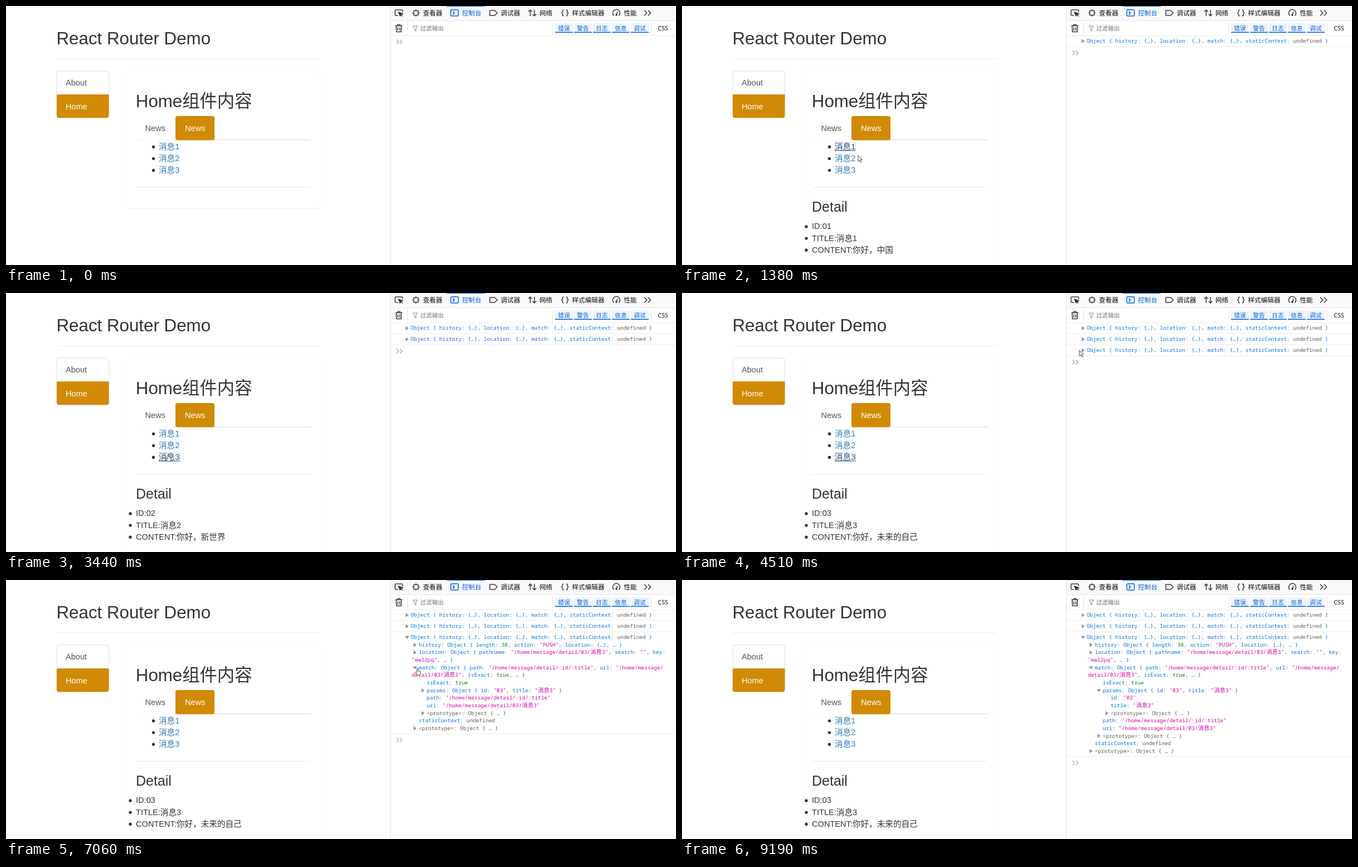
An HTML page that plays this animation: 1202x466 px, repeating every 9520 ms.

```html
<!DOCTYPE html>
<html lang="zh-CN">
<head>
<meta charset="utf-8">
<title>React Router Demo</title>
<style>
html, body { margin: 0; width: 100%; height: 100%; overflow: hidden; background: #fff; }
svg { display: block; width: 1202px; height: 466px; }
text { white-space: pre; font: 14.6px "Liberation Sans", "Noto Sans CJK SC", "Noto Sans CJK", sans-serif; fill: #333; }
.h2 { font-size: 31.3px; }
.h3 { font-size: 25px; }
.ui { font: 11.6px "Noto Sans", "Noto Sans CJK SC", "Noto Sans CJK", sans-serif; fill: #0c0c0d; }
.small { font-size: 10.6px; }
.mono { font: 9.507px "Noto Sans Mono", "Noto Sans CJK SC", "Noto Sans CJK", monospace; }
.han { font-size: 10.4px; }
.icon { fill: none; stroke: #38383d; stroke-width: 1.5; stroke-linejoin: round; }
.cursor { fill: #fff; stroke: #333; stroke-width: .9; }
</style>
</head>
<body>
<svg viewBox="0 0 1202 466">
  <g id="page"></g>
  <g id="tools"></g>
  <g id="live"></g>
  <path id="arrow" class="cursor" d="M0 0V10.4L2.4 8.3L4 12L5.8 11.2L4.2 7.6H7.4Z"/>
  <path id="hand" class="cursor" d="M-1 1Q0 -1 1 1V5L5 6V8L4.500 13H-1L-4 8L-2.600 7L-1 8.400Z"/>
</svg>
<script>
const STEP = 82.07, STEPS = 116;
const GOLD = '#d08a04', BLUE = '#0074e8', LINK = '#0060df', GRAY = '#5c5c5f', PINK = '#dd00a9', GREEN = '#058b00';
const $ = id => document.getElementById(id);
const esc = s => s.replace(/&/g, '&amp;').replace(/</g, '&lt;');

const text = (x, y, s, cls = '', fill = '') =>
  `<text x="${x}" y="${y}" class="${cls}"${fill && ` style="fill:${fill}"`}>${esc(s)}</text>`;
const rect = (x, y, w, h, fill, more = '') =>
  `<rect x="${x}" y="${y}" width="${w}" height="${h}" fill="${fill}" ${more}/>`;
const icon = (x, y, d, style = '') =>
  `<path class="icon" transform="translate(${x} ${y})" d="${d}" style="${style}"/>`;
const frame = (x, y, w, h, r, color = '#38383d') =>
  rect(x, y, w, h, 'none', `rx="${r}" stroke="${color}" stroke-width="1.5"`);
const dot = (x, y, r = 2.7) => `<circle cx="${x}" cy="${y}" r="${r}" fill="#333"/>`;
const chevrons = (x, y, r, color, w) => [x, x + r + 2].map(cx =>
  icon(cx, y, `M0 ${-r}l${r} ${r}l${-r} ${r}`, `stroke:${color};stroke-width:${w}`)).join('');

function drawPage() {
  return text(90.5, 68.5, 'React Router Demo', 'h2')
    + rect(90.5, 94.5, 473, 1, '#e9e9e9')
    + rect(91, 117, 93.5, 84, '#fff', 'rx="4" stroke="#ddd"')
    + rect(91, 159.3, 93.5, 42, GOLD, 'rx="4"') + rect(91, 159.3, 93.5, 10, GOLD)
    + text(107, 143, 'About', '', '#555') + text(107, 185.6, 'Home', '', '#fff')
    + text(232.8, 182, 'Home组件内容', 'h2')
    + rect(233, 240, 314, 1.4, '#ddd')
    + rect(233, 198, 69.5, 43.5, '#fff', 'rx="4"')
    + rect(304, 198, 70, 43.5, GOLD, 'rx="4"')
    + text(249.5, 225, 'News', '', '#555') + text(321, 225, 'News', '', '#fff')
    + rect(233, 325.8, 314, 1, '#e9e9e9');
}

function drawIcons() {
  return icon(698, 7, 'M5 10H1.5Q0 10 0 8.5V1.5Q0 0 1.5 0H12Q13.5 0 13.5 1.5V4')
    + icon(704, 11, 'M0 0L8 3L5 4L3 7ZM4 4L7.500 7.500', 'fill:#38383d')
    + frame(731.5, 8.5, 8, 8, 0) + icon(735.5, 12.5, 'M0 -6.500v2.500M0 4v2.500M-6.500 0h2.500M4 0h2.500')
    + frame(798, 6.8, 13.5, 11.2, 1.5, LINK) + icon(801.5, 9.6, 'M0 0l3 3l-3 3', `stroke:${LINK}`)
    + icon(868, 8, 'M0 0H8.500L13.500 4.500L8.500 9H0Z')
    + icon(940.5, 7, 'M0 11V0M-3.300 3.500L0 0L3.300 3.500') + icon(948, 18, 'M0 -11V0M-3.300 -3.500L0 0L3.300 -3.500')
    + icon(1000.5, 7, 'M0 0Q-2 0 -2 2V4L-4 5.500L-2 7V9Q-2 11 0 11')
    + icon(1005, 7, 'M0 0Q2 0 2 2V4L4 5.500L2 7V9Q2 11 0 11')
    + icon(1095, 16, 'M-4.500 1.500A6.500 6.500 0 1 1 4.500 1.500M0 0L2 -5.500') + dot(1095, 16, 1.8)
    + chevrons(1145, 12.5, 4.8, '#38383d', 1.6)
    + icon(698.5, 35.5, 'M0 0H12.500M4 0V-2H8.500V0M1.500 0L2 11H10.500L11 0M4.500 3V8.500M8 3V8.500')
    + icon(730, 36, 'M0 0H8.500L5.500 4V9L3 7.500V4Z', 'stroke:#85858a;stroke-width:1');
}

function drawTools() {
  const tabs = { 查看器: 748, 控制台: 818, 调试器: 887.5, 网络: 957, 样式编辑器: 1015.5, 性能: 1108.5 };
  return rect(689, 0, 513, 26, '#f9f9fa') + rect(689, 26, 513, 1, '#e4e4e6')
    + rect(689, 53, 513, 1, '#ebebed') + rect(689, 0, 1, 466, '#e0e0e2')
    + rect(790, 0, 69, 1.2, '#0a84ff')
    + Object.entries(tabs).map(([s, x]) => text(x, 17, s, 'ui', s === '控制台' ? LINK : '')).join('')
    + drawIcons()
    + [720, 980, 1157].map(x => rect(x, 29, 1, 22, '#e6e6e8')).join('')
    + text(743, 44, '过滤输出', 'ui small', '#737373')
    + ['错误', '警告', '日志', '信息', '调试'].map((s, i) => {
      const x = 985 + 34 * i;
      return rect(x, 31, 32, 17, '#edf4fd', 'rx="2"') + rect(x, 46.6, 32, 1.6, LINK)
        + text(x + 5.3, 43.8, s, 'ui small', LINK);
    }).join('')
    + text(1169.5, 43.8, 'CSS', 'ui small');
}

// One console line, coloured by token.
function code(x, y, s) {
  const color = t => s[0] === '<' || t === 'undefined' ? GRAY
    : /^("|detail)/.test(t) ? PINK : /^(\d+|true)$/.test(t) ? GREEN : BLUE;
  const spans = s.split(/((?:"|^detail)[^"]*"?|\b\d+\b(?=,)|\btrue\b|\bundefined\b)/).filter(Boolean).map(t =>
    `<tspan style="fill:${color(t)}">${esc(t).replace(/[\u4e00-\u9fff]+/g, m => `<tspan class="han">${m}</tspan>`)}</tspan>`);
  return `<text x="${x}" y="${y}" class="mono">${spans.join('')}</text>`;
}

const twisty = (x, y, open) =>
  `<path transform="translate(${x} ${y}) rotate(${open ? 90 : 0})" d="M-2.300 -3.800v7.600l5-3.800Z" fill="#8f8f93"/>`;

const SUMMARY = 'Object { history: {…}, location: {…}, match: {…}, staticContext: undefined }';
const PROTO = '<prototype>: Object { … }';
const PATH = '"/home/message/detail/:id/:title"', URL3 = '"/home/message/detail/03/消息3"';

// Rows are [depth, twisty, text]; depth 0 marks a wrapped line.
function tree(match, params) {
  return [
    [1, '+', 'history: Object { length: 38, action: "PUSH", location: {…}, … }'],
    [1, '+', `location: Object { pathname: ${URL3}, search: "", key:`],
    [0, '', '"mw12pq", … }'],
    [1, match ? '-' : '+', `match: Object { path: ${PATH}, url: "/home/message/`],
    [0, '', 'detail/03/消息3", isExact: true, … }'],
    ...(match ? [
      [2, '', 'isExact: true'],
      [2, params ? '-' : '+', 'params: Object { id: "03", title: "消息3" }'],
      ...(params ? [[3, '', 'id: "03"'], [3, '', 'title: "消息3"'], [3, '+', PROTO]] : []),
      [2, '', `path: ${PATH}`],
      [2, '', `url: ${URL3}`],
      [2, '+', PROTO]
    ] : []),
    [1, '', 'staticContext: undefined'],
    [1, '+', PROTO]
  ];
}

function drawConsole(logs, open) {
  const rows = open ? tree(open > 1, open > 2) : [];
  const grow = 13.64 * rows.length;
  let out = '';
  for (let i = 0; i < logs; i++) {
    const y = 62.8 + 20 * i, last = i === 2;
    out += twisty(719.5, y + .4, last && open) + code(726, y + 3.4, SUMMARY)
      + rect(690, y + 9.8 + (last ? grow : 0), 512, 1, '#ececee');
  }
  rows.forEach(([depth, mark, s], i) => {
    const y = 102.8 + 13.64 * (i + 1), x = depth ? 726.3 + 14.2 * depth : 728;
    if (mark) out += twisty(x - 6.8, y + .4, mark === '-');
    out += code(x, y + 3.4, s);
  });
  return out + chevrons(700.5, 64.5 + 20 * logs + grow, 4, '#a0a0a5', 1.2);
}

const CONTENT = ['', '你好，中国', '你好，新世界', '你好，未来的自己'];

function drawLive({ focus, hover, detail, logs, open }) {
  let out = rect(216.5, 116.5, 347, detail ? 380 : 247.5, 'none', 'rx="4" stroke="#fbfbfb"');
  if (!detail) out += rect(218, 363.8, 344, 1, '#efefef');
  for (let i = 1; i <= 3; i++) {
    const y = 236.8 + 21.1 * i, lit = i === focus || i === hover;
    out += dot(264.5, y - 4.4) + text(274, y, '消息' + i, '', lit ? '#23527c' : '#337ab7');
    if (lit) out += rect(274, y + 1.6, 37.4, 1, '#23527c');
    if (i === focus) out += rect(274.5, y - 12.4, 37, 15, 'none', 'stroke="#23527c" stroke-width=".8" stroke-dasharray="1" opacity=".6"');
  }
  if (detail) {
    out += text(233, 370, 'Detail', 'h3');
    ['ID:0' + detail, 'TITLE:消息' + detail, 'CONTENT:' + CONTENT[detail]].forEach((s, i) => {
      const y = 401.4 + 21.1 * i;
      out += dot(223, y - 4.4) + text(233, y, s);
    });
  }
  return out + drawConsole(logs, open);
}

// Pointer path: step, x, y
const MOVES = [
  [3, 1016, 198], [6, 700, 226], [9, 400, 246], [11, 300, 252], [14, 290, 253],
  [17, 316, 269], [19, 325, 272], [24, 304, 272], [28, 286, 273], [35, 286, 274],
  [42, 291, 290], [44, 291, 290], [46, 315, 283], [52, 660, 124], [55, 713, 103],
  [60, 718, 102], [68, 735, 135], [73, 736, 133], [75, 735, 130], [78, 735, 130],
  [82, 737, 154], [85, 737, 154], [95, 750, 194], [98, 758, 210], [101, 775, 228],
  [107, 884, 264], [112, 1265, 464]
];

function pointer(n) {
  const i = MOVES.findIndex(m => m[0] > n) - 1;
  if (i < 0) return null;
  const [n0, x0, y0] = MOVES[i], [n1, x1, y1] = MOVES[i + 1];
  const k = (n - n0) / (n1 - n0);
  return { x: x0 + (x1 - x0) * k, y: y0 + (y1 - y0) * k };
}

function linkAt(p) {
  if (!p || p.x < 272 || p.x > 312) return 0;
  const i = Math.floor((p.y - 245) / 21.1) + 1;
  return i >= 1 && i <= 3 ? i : 0;
}

// How many of the given steps have been reached.
const count = (n, steps) => steps.filter(s => n >= s).length;

let shown = '';
function draw() {
  const t = performance.now() % 9520;
  const n = Math.min(STEPS - 1, Math.floor((t + 17) / STEP));
  const p = pointer(n);
  const state = {
    focus: n >= 57 ? 0 : count(n, [13, 33, 42]),
    hover: linkAt(p),
    detail: count(n, [14, 35, 44]),
    logs: count(n, [15, 36, 45]),
    open: count(n, [59, 84, 96])
  };
  const key = JSON.stringify(state);
  if (key !== shown) {
    $('live').innerHTML = drawLive(state);
    shown = key;
  }
  const kind = state.hover || (n >= 57 && n < 98) ? 'hand' : 'arrow';
  for (const id of ['arrow', 'hand']) {
    $(id).style.display = p && id === kind ? '' : 'none';
    if (p) $(id).setAttribute('transform', `translate(${p.x} ${p.y})`);
  }
  requestAnimationFrame(draw);
}

$('page').innerHTML = drawPage();
$('tools').innerHTML = drawTools();
draw();
</script>
</body>
</html>
```
